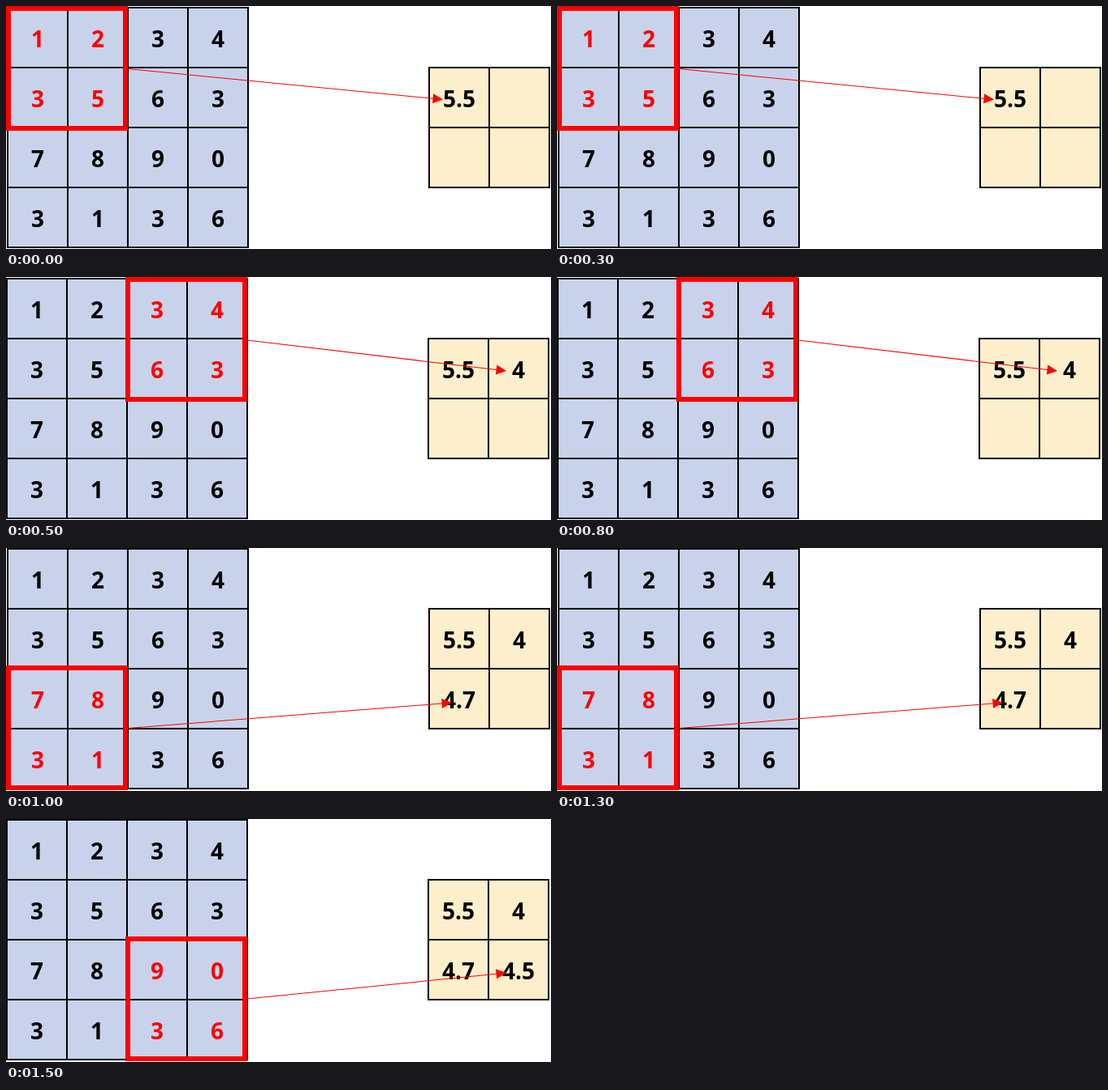
An HTML page for the animation above (2 s loop, 671 by 300 pixels).

```html
<!DOCTYPE html>
<html lang="en">
<head>
<meta charset="utf-8">
<title>Average pooling</title>
<style>
  html, body { margin: 0; width: 100%; height: 100%; overflow: hidden; background: #fff; }
  svg { display: block; width: 671px; height: 300px; }
  text { font: bold 28px "Open Sans", "Noto Sans", sans-serif; text-anchor: middle; }
  .step { opacity: 0; animation: show 2s step-end infinite; }
  .grid { stroke: #000; stroke-width: 2; stroke-linecap: square; }
  .window { fill: none; stroke: #f00; stroke-width: 6; }
  .arrow { stroke: #f00; stroke-width: 1; }
  .hot { fill: #f00; }
  @keyframes show {
    0% { opacity: 1; }
    25%, 100% { opacity: 0; }
  }
</style>
</head>
<body>
<svg id="stage" viewBox="0 0 671 300"></svg>
<script>
const CELL = 74;
const input = [[1, 2, 3, 4], [3, 5, 6, 3], [7, 8, 9, 0], [3, 1, 3, 6]];
const pooled = ['5.5', '4', '4.7', '4.5'];
const arrows = [
  [150, 77.5, 538, 115.5],
  [297, 78, 616, 116],
  [150, 222.5, 549, 191],
  [297, 222, 616, 190]
];

function grid(x, y, n, fill) {
  const size = n * CELL;
  let d = '';
  for (let i = 0; i <= n; i++) {
    d += `M${x} ${y + i * CELL}h${size}M${x + i * CELL} ${y}v${size}`;
  }
  return `<rect x="${x}" y="${y}" width="${size}" height="${size}" fill="${fill}"/>` +
    `<path class="grid" d="${d}"/>`;
}

function label(value, x, y, hot) {
  return `<text x="${x}" y="${y}"${hot ? ' class="hot"' : ''}>${value}</text>`;
}

function arrow([x1, y1, x2, y2]) {
  const angle = Math.atan2(y2 - y1, x2 - x1) * 180 / Math.PI;
  const length = Math.hypot(x2 - x1, y2 - y1);
  return `<g transform="translate(${x1} ${y1}) rotate(${angle})">` +
    `<path class="arrow" d="M0 0H${length - 10}"/>` +
    `<path class="hot" d="M${length} 0l-12.5 -6v12z"/></g>`;
}

function step(i) {
  const col = i % 2, row = i >> 1;
  // The whole diagram sits one pixel further left or up on odd columns and rows.
  const dx = -col, dy = -row;
  let out = grid(2 + dx, 2 + dy, 4, '#c8d3eb') + grid(521 + dx, 76 + dy, 2, '#fdefcb');
  input.forEach((line, r) => line.forEach((value, c) => {
    const hot = c >> 1 === col && r >> 1 === row;
    out += label(value, 39 + c * CELL + dx, 51 + r * CELL + dy, hot);
  }));
  pooled.slice(0, i + 1).forEach((value, k) => {
    out += label(value, 558 + k % 2 * CELL + dx, 125 + (k >> 1) * CELL + dy);
  });
  out += `<rect class="window" x="${3 + col * 147}" y="${3 + row * 145}" width="144" height="148"/>`;
  return `<g class="step" style="animation-delay:${i * 500 - 2000}ms">${out}${arrow(arrows[i])}</g>`;
}

document.getElementById('stage').innerHTML = pooled.map((_, i) => step(i)).join('');
</script>
</body>
</html>
```
